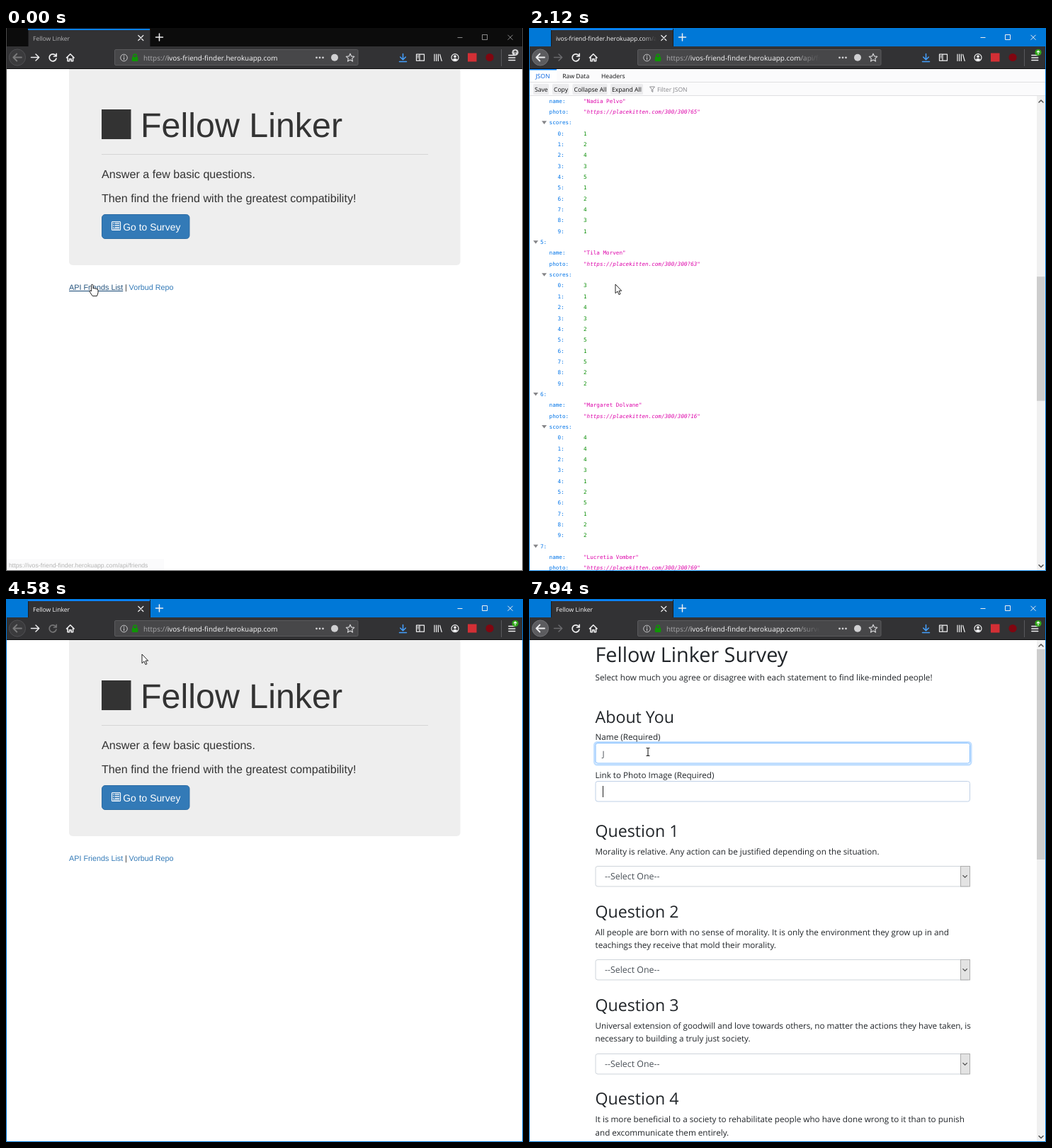
Write an HTML page that moves like this. It is 730 px wide and 767 px high and loops after 8000 ms.

```html
<!DOCTYPE html>
<html lang="en">
<head>
<meta charset="utf-8">
<title>Fellow Linker</title>
<style>
html, body { margin: 0; width: 100%; height: 100%; overflow: hidden; background: #fff; }
svg { display: block; width: 100vw; height: 100vh; }
text { font-family: "Open Sans", "Noto Sans", sans-serif; text-rendering: geometricPrecision; white-space: pre; }
.arial text { font-family: "Liberation Sans", Arial, sans-serif; }
.mono text { font-family: "DejaVu Sans Mono", "Liberation Mono", monospace; font-size: 7.61px; }
.line { fill: none; stroke: #f0f0f1; stroke-width: 1.5; stroke-linecap: round; stroke-linejoin: round; }
</style>
</head>
<body>
<svg id="stage" viewBox="0 0 730 767" xmlns="http://www.w3.org/2000/svg"></svg>
<script>
const LOOP = 8000, STEP = 70;
const HOST = "ivos-friend-finder.herokuapp.com";
const APP = "Fellow Linker";

const rect = (x, y, w, h, fill, more = "") =>
  `<rect x="${x}" y="${y}" width="${w}" height="${h}" fill="${fill}" ${more}/>`;
const text = (x, y, size, fill, str, more = "") =>
  `<text x="${x}" y="${y}" font-size="${size}" fill="${fill}" ${more}>${str}</text>`;
const line = (d, more = "") => `<path class="line" d="${d}" ${more}/>`;
const shape = (d, fill, more = "") => `<path d="${d}" fill="${fill}" ${more}/>`;
const dot = (x, y, r, fill, more = "") => `<circle cx="${x}" cy="${y}" r="${r}" fill="${fill}" ${more}/>`;
const group = (id, body, more = "") => `<g id="${id}" ${more}>${body}</g>`;
const paper = rect(1, 58, 728, 708, "#fff");

// Landing page
function homePage() {
  const rows = [275, 278, 281].map(y =>
    rect(151, y, 1.4, 1.4, "#fff") + rect(153.5, y, 6.5, 1.4, "#fff")).join("");
  return paper +
    rect(89, 53, 552.5, 282, "#eee", 'rx="5"') +
    rect(135, 115, 41.5, 42, "#333") +
    text(190, 153.5, 48.4, "#333", APP) +
    rect(135, 178, 461, 1, "#d5d5d5") +
    text(135, 212, 16.14, "#333", "Answer a few basic questions.") +
    text(135, 246.3, 16.14, "#333", "Then find the friend with the greatest compatibility!") +
    rect(135.5, 263.5, 123.5, 34, "#337ab7", 'id="go" rx="4.5" stroke="#2e6da4"') +
    rect(149.5, 273.5, 12, 12, "none", 'stroke="#fff" stroke-width="1.2" rx="1"') + rows +
    rect(151, 283.4, 9, 1, "#fff") +
    text(165.3, 285.5, 13.9, "#fff", "Go to Survey") +
    text(89, 370, 10.8, "#337ab7", "API Friends List", 'id="api"') +
    text(168, 370, 10.8, "#333", "|") +
    text(173.6, 370, 10.8, "#337ab7", "Vorbud Repo") +
    group("status", rect(1, 750, 222, 16, "#f9f9fa") +
      text(4, 762.3, 8.76, "#6a6a6a", `https://${HOST}/api/friends`));
}

// JSON viewer
const ROW = 15.342, SCROLL_END = 1692;
const people = [
  ["Tomas Brenvick", 50, "1555115511"], ["Lena Thornquill", 13, "1555155554"],
  ["Edmund Krall", 20, "3333333333"], ["Oscar Wendrum", 37, "2415324135"],
  ["Nadia Pelvo", 65, "1243512431"], ["Tila Morven", 63, "3143251522"],
  ["Margaret Dolvane", 16, "4443125122"], ["Lucretia Vomber", 69, "2514332513"],
  ["Heike Dorla", 32, "3144223512"], ["Ronald Wexby", 49, "4123525335"],
  ["Asdf", 0, "5555555555"]
];

function jsonRows() {
  const KEY = "#0074e8", STR = "#dd00a9", NUM = "#058b00";
  let out = "", twisties = "", y = 106.8;
  const row = (x, key, value = "", color = STR, more = "") => {
    out += text(x, y, 7.61, KEY, key + ":") + (value && text(77, y, 7.61, color, value, more));
    y += ROW;
  };
  const twisty = x => { twisties += shape(`M${x} ${y - 5}h7l-3.5 4.6z`, "#858588"); };
  people.forEach(([name, photo, scores], i) => {
    twisty(6);
    row(16, i);
    row(28.6, "name", `"${name}"`);
    if (photo) row(28.6, "photo", `"https://placekitten.com/300/300?${photo}"`, STR, 'font-style="italic"');
    else row(28.6, "photo", '"asdf"');
    twisty(18);
    row(28.6, "scores");
    [...scores].forEach((s, k) => photo ? row(40.6, k, s, NUM) : row(40.6, k, `"${s}"`));
  });
  return out + group("twisties", twisties);
}

function scrollBar(top, thumbY, thumbH, id) {
  return rect(717, top, 12, 766 - top, "#f0f0f0") +
    rect(717, thumbY, 11.5, thumbH, "#cdcdcd", `id="${id}"`) +
    line(`M720 ${top + 9}l3 -3 3 3M720 758.5l3 3 3 -3`, 'style="stroke:#505050"');
}

function jsonPage() {
  const buttons = [["Save", 6, 22], ["Copy", 33, 23.5], ["Collapse All", 61.5, 49], ["Expand All", 115, 46]];
  return paper +
    `<g clip-path="url(#jsonClip)"><g id="rows" class="mono">${jsonRows()}</g></g>` +
    rect(1, 58, 728, 38, "#fbfbfc") + rect(1, 58, 38, 18, "#fff") +
    rect(1, 58, 38, 1.5, "#0a84ff") + rect(1, 76, 728, 1, "#e0e0e2") + rect(1, 95, 728, 1, "#e0e0e2") +
    text(9.3, 70.5, 8.6, "#0060df", "JSON") + text(47.3, 70.5, 8.6, "#0c0c0d", "Raw Data") +
    text(102, 70.5, 8.6, "#0c0c0d", "Headers") +
    buttons.map(([s, x, w]) => rect(x, 79, w, 15, "#ebebed", 'rx="1.5"') +
      text(x + 2, 89.8, 8.6, "#0c0c0d", s)).join("") +
    shape("M170.5 83h7l-2.7 3.4v4l-1.6 -1v-3z", "none", 'id="funnel" stroke="#8c8c90"') +
    text(181, 89.8, 8.6, "#85858a", "Filter JSON") +
    scrollBar(96, 109, 175.5, "thumb");
}

// Survey page
function surveyPage() {
  const INK = "#212529", GREY = "#ced4da";
  const h2 = (y, s) => text(93.5, y, 23.2, INK, s);
  const p = (y, s) => text(93.5, y, 11.7, INK, s);
  const box = (y, id = "") => rect(94, y + .5, 528.5, 28.5, "#fff", `${id} rx="3" stroke="${GREY}"`);
  const select = y => box(y) + text(107, y + 19, 12.4, "#495057", "--Select One--") +
    rect(609.5, y + .5, 13, 28.5, "#e3e3e3", 'stroke="#adadad"') +
    line(`M612.8 ${y + 13.5}l2.8 2.8 2.8 -2.8`, 'style="stroke:#505050;stroke-width:1.1"');
  return paper +
    text(93.5, 89, 28.8, INK, APP + " Survey") +
    p(115, "Select how much you agree or disagree with each statement to find like-minded people!") +
    h2(175, "About You") + p(199.3, "Name (Required)") +
    rect(92.3, 202.3, 532, 32, "none", 'id="ring" rx="4" stroke="#007bff" stroke-opacity=".25" stroke-width="2.4"') +
    box(203, 'id="nameBox"') + text(103.5, 222.5, 11.6, "#495057", "J", 'id="typed"') +
    p(253, "Link to Photo Image (Required)") + box(257, 'id="photoBox"') +
    rect(104, 210, 1, 16, "#222", 'id="caret"') +
    h2(336, "Question 1") + p(360.5, "Morality is relative. Any action can be justified depending on the situation.") + select(377) +
    h2(450, "Question 2") +
    p(474.5, "All people are born with no sense of morality. It is only the environment they grow up in and") +
    p(493, "teachings they receive that mold their morality.") + select(509) +
    h2(582, "Question 3") +
    p(607, "Universal extension of goodwill and love towards others, no matter the actions they have taken, is") +
    p(625.3, "necessary to building a truly just society.") + select(642) +
    h2(714, "Question 4") +
    p(739, "It is more beneficial to a society to rehabilitate people who have done wrong to it than to punish") +
    p(757.7, "and excommunicate them entirely.") +
    scrollBar(58, 71, 297, "surveyThumb");
}

// Browser window
function chrome() {
  const BAR = "#323234";
  return rect(0, 0, 730, 26, "#0078d7", 'id="titleBar"') +
    rect(31, 1, 173, 26, "#1c1c1e") + rect(32, 1, 171, 26, BAR) + rect(31, 1, 172, 2, "#0a84ff") +
    rect(0, 26, 730, 31, BAR) + rect(0, 57, 730, 1, "#0c0c0d") +
    text(38, 17.5, 8.6, "#f9f9fa", "", 'id="tabText" clip-path="url(#tabClip)"') +
    rect(160, 5, 20, 18, "url(#tabFade)") +
    line("M186.8 10.5l7 7M193.8 10.5l-7 7", 'style="stroke-width:1.2"') +
    line("M211.5 13h10M216.5 8v10") +
    `<g id="winButtons">${line("M637.5 13.5h7M672.5 9.5h7v7h-7zM708.5 9.8l7 7M715.5 9.8l-7 7", 'style="stroke-width:1;stroke-linecap:butt"')}</g>` +
    dot(16, 41.5, 11.5, "#5c5c5f", 'id="backDisc" stroke="#727275"') +
    line("M22 41.5h-11.5M15.3 36.5l-5 5 5 5", 'id="back" style="stroke-width:1.8"') +
    line("M35.5 41.5h11M42 37l4.7 4.5 -4.7 4.5", 'id="forward"') +
    line("M70.3 39a5 5 0 1 0 .7 4M71.2 36.3v3.7h-3.7", 'id="reload" style="stroke-width:1.7"') +
    line("M61.5 37l9 9M70.5 37l-9 9", 'id="stop"') +
    line("M61.5 37l9 9", 'id="stopFade" style="stroke:#79585a"') +
    line("M85.5 42l5.3 -5.2 5.3 5.2M87 41.5v5.2h2.5v-3h2.6v3h2.5v-5.2", 'style="stroke-width:1.6"') +
    rect(153.5, 30.5, 343.5, 22, "#474749", 'rx="1.5" stroke="#5a5a5d"') +
    dot(166.5, 42, 4.8, "none", 'stroke="#c8c8ca"') + rect(166, 41.3, 1.1, 3.6, "#c8c8ca") + dot(166.5, 39.5, .8, "#c8c8ca") +
    rect(177.8, 41, 8.6, 6, "#0f9505", 'rx="1"') +
    shape("M179.7 41v-1.5a2.4 2.4 0 0 1 4.8 0v1.5", "none", 'stroke="#0f9505" stroke-width="1.5"') +
    `<text x="194" y="45.8" font-size="9.94" fill="#a9a9ab" clip-path="url(#urlClip)">https://<tspan fill="#f9f9fa">${HOST}</tspan><tspan id="urlPath"></tspan></text>` +
    rect(386, 33, 25, 18, "url(#urlFade)") +
    [438.5, 443, 447.5].map(x => dot(x, 41.8, 1.4, "#d5d5d7")).join("") +
    dot(464, 41.8, 5, "#d0d0d2") +
    line("M486 36.2l1.7 3.7 4 .5 -3 2.7 .8 4 -3.5 -2 -3.5 2 .8 -4 -3 -2.7 4 -.5z", 'style="stroke:#d5d5d7;stroke-width:1.2"') +
    line("M560.5 36.5v8M556.7 41l3.8 3.8 3.8 -3.8M555.5 47.5h10", 'style="stroke:#45a1ff"') +
    line("M579.5 37.2h11v9h-11zM584 37.2v9M581 39.7h1.5M581 42h1.5", 'style="stroke-width:1.2"') +
    line("M605 37v9.5M607.7 37v9.5M610.4 37v9.5M612.6 37.3l2.6 9.2", 'style="stroke-width:1.2"') +
    dot(634, 41.7, 5, "none", 'stroke="#f0f0f1" stroke-width="1.2"') + dot(634, 40.2, 1.9, "#f0f0f1") +
    shape("M630.6 44.3q3.4 -3 6.8 0q-3.4 3.7 -6.8 0z", "#f0f0f1") +
    rect(652, 35.5, 12.5, 12, "#d32f35") + dot(683, 41.5, 5.6, "#800610") +
    rect(699, 30, 1, 24, "#59595c") +
    line("M709.8 38.5h9M709.8 42h9M709.8 45.5h9", 'style="stroke-width:1.4"') +
    dot(719, 34.5, 4.6, "#30a818", 'id="badge"') +
    line("M719 37v-4.5M717.2 34l1.8 -1.8 1.8 1.8", 'id="badgeArrow" style="stroke-width:1.1"') +
    shape("M.5 0V766.5H729.5V0", "none", 'id="frame" stroke="#0078d7"');
}

function cursors() {
  const ink = 'stroke="#222" stroke-width="1" stroke-linejoin="round"';
  return group("arrow", shape("M0 0V12.7L3 10 5 14.6 7 13.7 5 9.2H8.7Z", "#fff", ink)) +
    group("hand", shape("M-1.6 7.4V1.2Q-.3 -.9 1 1.2V6Q2.5 4.8 3.6 6.3Q5 5.3 6 6.8Q7.7 6.2 8 8V12L6.4 16.6H.2L-3.8 10.6Q-4.4 8.4 -2.6 8.8L-1.6 10Z", "#fff", ink)) +
    group("beam", shape("M-2.5 -5.5H-.8L0 -4.8 .8 -5.5H2.5M0 -4.8V4.8M-2.5 5.5H-.8L0 4.8 .8 5.5H2.5", "none", 'stroke="#222" stroke-width="1.1"'));
}

const fade = (id, color) => `<linearGradient id="${id}"><stop stop-color="${color}" stop-opacity="0"/><stop offset="1" stop-color="${color}"/></linearGradient>`;
const clip = (id, ...box) => `<clipPath id="${id}">${rect(...box, "#000")}</clipPath>`;
const stage = document.getElementById("stage");
stage.innerHTML = `<defs>${fade("tabFade", "#323234")}${fade("urlFade", "#474749")}` +
  clip("jsonClip", 1, 96, 716, 670) + clip("tabClip", 38, 3, 142, 23) + clip("urlClip", 190, 31, 220, 22) + "</defs>" +
  group("home", homePage(), 'class="arial"') + group("json", jsonPage()) + group("survey", surveyPage()) +
  chrome() + group("pointer", cursors());

const el = {};
stage.querySelectorAll("[id]").forEach(n => { el[n.id] = n; });
const set = (id, name, value) => el[id].setAttribute(name, value);
const show = (id, on) => set(id, "display", on ? "inline" : "none");
const within = (t, a, b) => t >= a && t < b;

// Fraction of a move made in `n` discrete steps, the first at `start`
const progress = (t, start, n) => Math.min(1, Math.max(0, Math.floor((t - start) / STEP) + 1) / n);

const moves = [ // start, steps, x, y
  [2990, 3, 15, 162], [3530, 1, 5, 36], [3600, 2, 11, 37],
  [4370, 4, 192, 78], [4650, 8, 200, 270],
  [6050, 3, 170, 226], [6260, 8, 168, 216]
];
function pointerAt(t) {
  let x = 122, y = 362;
  for (const [start, n, tx, ty] of moves) {
    const p = progress(t, start, n);
    x += (tx - x) * p;
    y += (ty - y) * p;
  }
  return [x, y];
}

const FOCUS = 670, JSON_AT = 950, HOME_AT = 3880, SURVEY_AT = 5560;

function draw(t) {
  const page = within(t, JSON_AT, HOME_AT) ? "json" : t >= SURVEY_AT ? "survey" : "home";
  const isHome = page === "home", focused = t >= FOCUS;
  for (const id of ["home", "json", "survey"]) show(id, id === page);

  const accent = focused ? "#0078d7" : "#0c0c0c";
  set("titleBar", "fill", accent);
  set("frame", "stroke", focused ? accent : "#4a4a4a");
  set("winButtons", "opacity", focused ? 1 : .55);
  set("tabText", "fill", focused ? "#f9f9fa" : "#b4b4b6");
  set("badge", "fill", focused ? "#30a818" : "#d7d7d9");
  set("badgeArrow", "style", `stroke-width:1.1;stroke:${focused ? "#fff" : "#444"}`);
  el.tabText.textContent = page === "json" ? HOST + "/api/friends" : APP;
  el.urlPath.textContent = { home: "", json: "/api/friends", survey: "/survey" }[page];

  // Navigation buttons
  const backHover = within(t, 3530, HOME_AT);
  set("backDisc", "fill", isHome ? "#3b3b3d" : backHover ? "#858587" : "#5c5c5f");
  set("backDisc", "stroke", isHome ? "#505053" : "#727275");
  set("back", "opacity", isHome ? .35 : 1);
  set("forward", "opacity", isHome ? 1 : .3);
  const loading = within(t, 740, JSON_AT) || within(t, 3670, HOME_AT) || within(t, 5280, SURVEY_AT);
  const stopping = within(t, JSON_AT, 1510);
  const dim = within(t, 1510, 1710) || within(t, HOME_AT, 4720) || within(t, SURVEY_AT, 6400);
  show("stop", loading);
  show("stopFade", stopping);
  show("reload", !loading && !stopping);
  set("reload", "opacity", dim ? .35 : 1);

  // Landing page
  const linkHover = t < JSON_AT, goHover = within(t, 5070, SURVEY_AT);
  set("api", "fill", linkHover ? "#23527c" : "#337ab7");
  set("api", "text-decoration", linkHover ? "underline" : "none");
  set("go", "fill", goHover ? "#286090" : "#337ab7");
  show("status", linkHover);
  set("status", "opacity", t < 70 ? .5 : 1);

  // JSON scroll
  const p = progress(t, 1910, 8);
  const eased = (p + p * p * (3 - 2 * p)) / 2 + .07 * p * (1 - p);
  set("rows", "transform", `translate(0 ${-SCROLL_END * eased})`);
  set("thumb", "y", 109 + 468 * eased);
  show("twisties", t >= 1440);
  show("funnel", t >= 1440);

  // Survey form
  const second = t >= 7940, typed = t >= 7670;
  show("ring", t >= 6870);
  set("ring", "opacity", t < 6940 ? .5 : 1);
  set("nameBox", "stroke", t >= 6870 ? "#80bdff" : "#ced4da");
  set("photoBox", "stroke", second ? "#bfd0e6" : "#ced4da");
  show("typed", typed);
  show("caret", within(t, 6870, 7270) || typed);
  set("caret", "x", typed && !second ? 108 : 104);
  set("caret", "y", second ? 264 : 210);

  const [x, y] = pointerAt(t);
  const kind = t < JSON_AT || within(t, 5070, SURVEY_AT) ? "hand" : t >= SURVEY_AT ? "beam" : "arrow";
  for (const id of ["arrow", "hand", "beam"]) show(id, id === kind);
  set("pointer", "transform", `translate(${x} ${y})`);
}

const began = performance.now();
function tick() {
  draw((performance.now() - began) % LOOP);
  requestAnimationFrame(tick);
}
tick();
</script>
</body>
</html>
```
